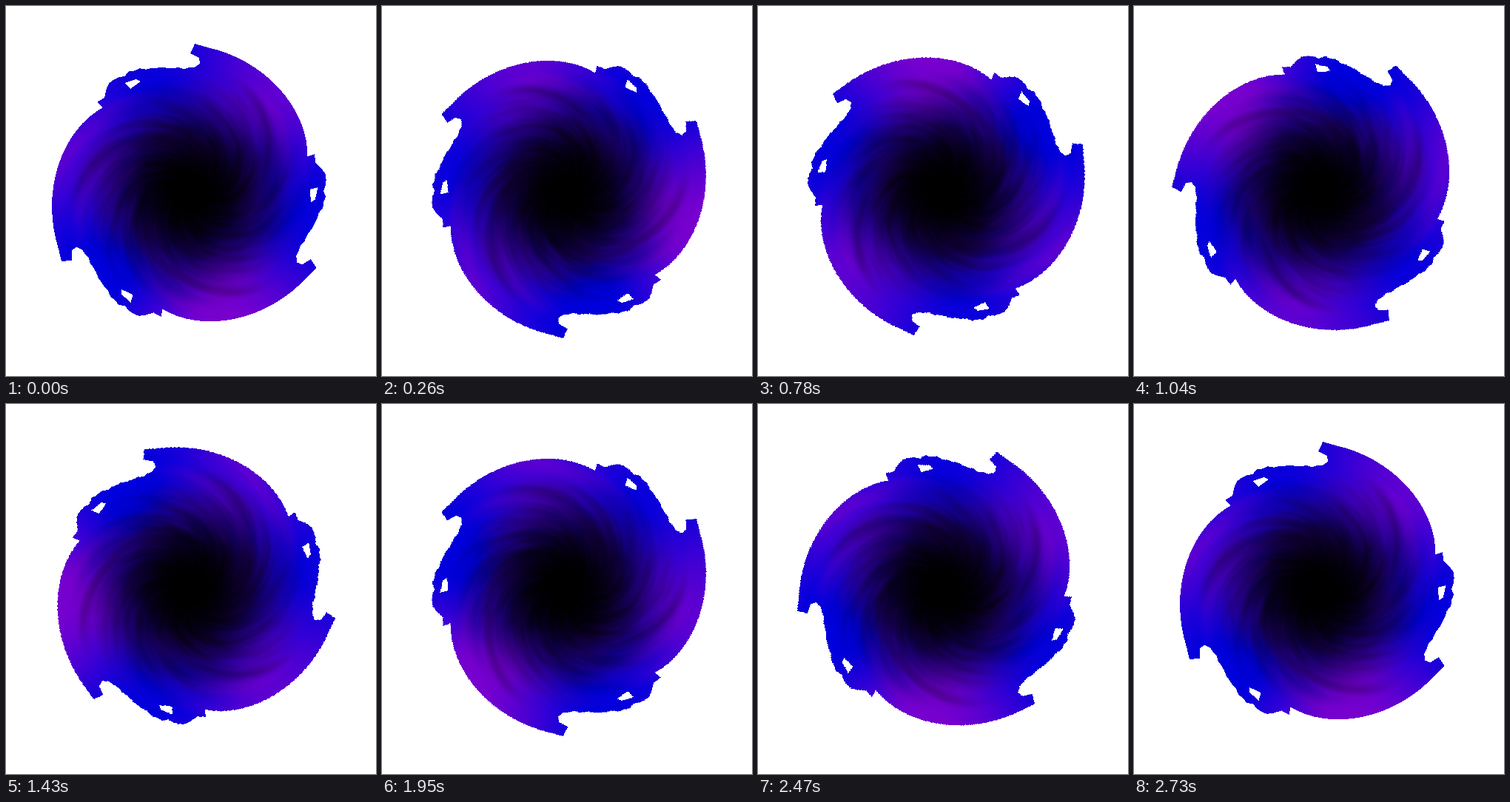
An HTML page with a canvas for the animation above (2.86 s loop, 500 by 500 pixels).

```html
<!DOCTYPE html>
<html lang="en">
<head>
<meta charset="utf-8">
<title>Vortex</title>
<style>
  html, body { margin: 0; width: 100%; height: 100%; overflow: hidden; background: #fff; }
  canvas { display: block; width: 100vw; height: 100vh; object-fit: contain; }
</style>
</head>
<body>
<canvas id="stage" width="500" height="500"></canvas>
<script>
const SIZE = 500, MID = 250, STEP_MS = 130, STEPS = 22;
const RAD = Math.PI / 180, TAU = Math.PI * 2, THIRD = TAU / 3;
const TWIST = 0.0148; // swirl in radians per pixel of radius

const clamp = v => Math.min(1, Math.max(0, v));
const mix = (a, b, t) => a + (b - a) * t;
const ease = t => t * t * (3 - 2 * t);
const smooth = (a, b, v) => ease(clamp((v - a) / (b - a)));
const wave = (angle, count, peak) => Math.cos(count * (angle - peak * RAD));

function hash(i, j) {
  const v = Math.sin(i * 127.1 + j * 311.7) * 43758.5453;
  return v - Math.floor(v);
}

// Value noise that wraps around the circle after `cells` cells
function noise(angle, v, cells) {
  const u = ((angle / TAU) % 1 + 1) % 1 * cells;
  const i = Math.floor(u), j = Math.floor(v);
  const a = i % cells, b = (i + 1) % cells;
  const fu = ease(u - i), fv = ease(v - j);
  return mix(mix(hash(a, j), hash(b, j), fu),
             mix(hash(a, j + 1), hash(b, j + 1), fu), fv);
}

// Clockwise from the top
function polar(degrees, r) {
  return [MID + r * Math.sin(degrees * RAD), MID - r * Math.cos(degrees * RAD)];
}

function turn([x, y], angle) {
  const c = Math.cos(angle), s = Math.sin(angle);
  x -= MID; y -= MID;
  return [MID + x * c - y * s, MID + x * s + y * c];
}

// One third of the rim: horn tip, smooth arc, spike, ragged edge, hook
function buildRim() {
  const points = [[75, 345]];
  for (let t = 0.06; t <= 1; t += 0.06) {
    points.push(polar(242 + 71.5 * t, 197 - 26 * t - 7 * t ** 6));
  }
  points.push([131, 137], [123, 130], [133, 124]);
  for (let s = 0.14; s < 1; s += 0.05) {
    const jag = (hash(Math.round(s * 20), 7) - 0.5) * 5;
    points.push(polar(313.5 + 48.5 * s, 173 + 8 * Math.cos((s - 0.28) * 4.2) + jag));
  }
  points.push([262, 78], [261, 70], [249, 64]);
  return points;
}

function addPolygon(path, points) {
  points.forEach(([x, y], i) => i ? path.lineTo(x, y) : path.moveTo(x, y));
  path.closePath();
}

function buildOutline() {
  const path = new Path2D(), edge = [], rim = buildRim();
  const hole = [[160, 104], [176, 99], [182, 102], [168, 112]];
  for (let k = 0; k < 3; k++) {
    const spin = p => turn(p, k * THIRD);
    edge.push(...rim.map(spin));
    addPolygon(path, hole.map(spin));
  }
  addPolygon(path, edge);
  return path;
}

function shade(x, y) {
  const dx = x - MID, dy = y - MID, r = Math.hypot(dx, dy);
  const angle = Math.atan2(dx, -dy), u = angle + r * TWIST;
  const wisp = 0.6 * noise(u, r / 28, 42) + 0.4 * noise(u, r / 14 + 40, 90);

  // Darkness in the middle, torn along the swirl
  const reach = r + (wisp - 0.5) * 26 * smooth(190, 130, r);
  let light = Math.pow(smooth(10, 168, reach), 1.4);

  // Three long dark arms
  const arm = Math.exp(18 * (wave(u, 3, 43) - 1));
  light *= 1 - 0.2 * arm * smooth(90, 115, r) * smooth(172, 145, r);

  // Purple lobes and blue gaps around the rim, an even mix further in
  const lobes = 0.42 + 0.4 * wave(angle, 3, 43) + 0.15 * wave(angle, 2, 170)
              + 0.06 * wave(angle, 1, 110);
  const cloud = (noise(u, r / 22 + 80, 24) - 0.5) * 0.2;
  const purple = clamp(mix(0.42, lobes, smooth(70, 155, r)) + cloud);
  return [118 * purple * light, 0, (220 - 14 * purple) * light];
}

function paintVortex() {
  const layer = document.createElement('canvas');
  layer.width = layer.height = SIZE;
  const pen = layer.getContext('2d');
  const outline = buildOutline();
  const image = pen.createImageData(SIZE, SIZE);
  for (let y = 45; y < 455; y++) {
    for (let x = 45; x < 455; x++) {
      if (!pen.isPointInPath(outline, x + 0.5, y + 0.5, 'evenodd')) continue;
      image.data.set([...shade(x, y), 255], (y * SIZE + x) * 4);
    }
  }
  pen.putImageData(image, 0, 0);
  return layer;
}

// The spin slows down: 30, then 20, then 10 degrees per step
function angleAt(step) {
  return -10 * (step + Math.min(step, 10) + Math.min(step, 5));
}

const ctx = document.getElementById('stage').getContext('2d');
const vortex = paintVortex();

function draw(time) {
  const step = Math.floor(time / STEP_MS) % STEPS;
  ctx.setTransform(1, 0, 0, 1, 0, 0);
  ctx.fillStyle = '#fff';
  ctx.fillRect(0, 0, SIZE, SIZE);
  ctx.translate(MID, MID);
  ctx.rotate(angleAt(step) * RAD);
  ctx.imageSmoothingEnabled = false;
  ctx.drawImage(vortex, -MID, -MID);
}

function tick(time) {
  draw(time);
  requestAnimationFrame(tick);
}

draw(0);
requestAnimationFrame(tick);
</script>
</body>
</html>
```
